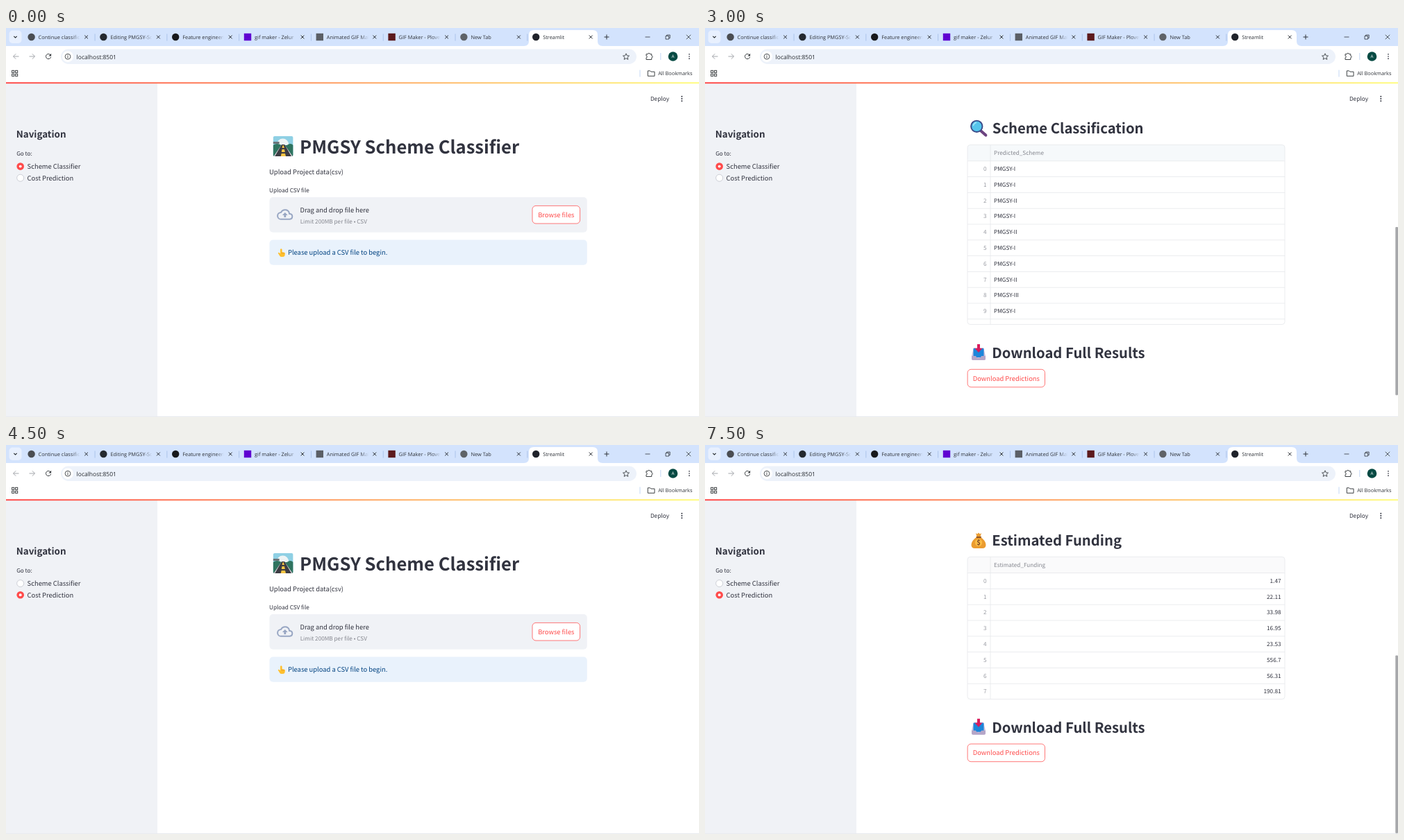
An HTML page for the animation above (9000 ms loop, 998 by 561 pixels).

```html
<!DOCTYPE html>
<html lang="en">
<head>
<meta charset="utf-8">
<title>Scheme Classifier</title>
<style>
  html, body { margin: 0; width: 100%; height: 100%; overflow: hidden; background: #fff; }
  #stage { display: block; width: 100vw; height: 100vh; }
  text { font-family: "Noto Sans CJK JP", "Noto Sans CJK SC", "Noto Sans CJK", sans-serif; white-space: pre; text-rendering: geometricPrecision; }
  .ui { font-family: "Open Sans", "Noto Sans", sans-serif; }
</style>
</head>
<body>
<svg id="stage" viewBox="0 0 998 561" xmlns="http://www.w3.org/2000/svg"></svg>
<script>
const INK = '#31333f', RED = '#ff4b4b', MUTED = '#85878f', PANEL = '#f0f2f6', STEEL = '#98a6c3', LINE = '#e6e8eb';
const BODY = 9.37, SMALL = 8.18, CELL = 8.2;

const text = (x, y, str, size = BODY, fill = INK, extra = '') =>
  `<text x="${x}" y="${y}" font-size="${size}" fill="${fill}" ${extra}>${str}</text>`;
const bold = (x, y, str, size) => text(x, y, str, size, INK, 'font-weight="700"');
const ui = (x, y, str, size = 7.4, fill = '#30343a', extra = '') => text(x, y, str, size, fill, `class="ui" ${extra}`);
const rect = (x, y, w, h, fill, r = 0, extra = '') =>
  `<rect x="${x}" y="${y}" width="${w}" height="${h}" rx="${r}" fill="${fill}" ${extra}/>`;
const circle = (x, y, r, fill, extra = '') => `<circle cx="${x}" cy="${y}" r="${r}" fill="${fill}" ${extra}/>`;
const shape = (d, fill) => `<path d="${d}" fill="${fill}"/>`;
const stroke = (d, color = '#3c4043', width = 1, extra = '') =>
  `<path d="${d}" fill="none" stroke="${color}" stroke-width="${width}" ${extra}/>`;
const cross = (x, y, r, color, width) =>
  stroke(`M${x - r} ${y - r}l${2 * r} ${2 * r}m0 ${-2 * r}l${-2 * r} ${2 * r}`, color, width);
const dots = (x, y, gap, r) => [-gap, 0, gap].map(d => circle(x, y + d, r, INK)).join('');
const move = (x, y, content, scale = 1) => `<g transform="translate(${x} ${y}) scale(${scale})">${content}</g>`;

// Browser window

const tabs = [
  ['Continue classification', 'circle', '#4a4d52'],
  ['Editing PMGSY-Scheme', 'circle', '#24292f'],
  ['Feature engineering', 'circle', '#17191c'],
  ['gif maker - Zelur', 'square', '#5f01d1'],
  ['Animated GIF Maker', 'square', '#5b5f66'],
  ['GIF Maker - Plovet', 'square', '#5c1a1d'],
  ['New Tab', 'circle', '#5f6368'],
  ['Streamlit', 'circle', '#20232b'],
];

function tab([title, kind, color], i) {
  const x = 36.6 + 103.8 * i, active = i === tabs.length - 1;
  const icon = kind === 'circle' ? circle(x, 13, 5.2, color) : rect(x - 5.2, 7.8, 10.4, 10.4, color);
  const back = active
    ? shape('M746 26q7 0 7-7V10q0-7 7-7h85q7 0 7 7v9q0 7 7 7z', '#fff')
    : rect(x + 91, 8.5, .9, 10, '#a8c0e8');
  return back + icon +
    `<svg x="${x + 9.6}" y="0" width="60" height="26">${ui(.4, 16, title)}</svg>` +
    (active ? '' : rect(x + 58, 6, 12, 14, 'url(#tabFade)')) +
    cross(x + 79, 13, 2.4, '#2b2f35', 1);
}

const toolbar = () => {
  const arrow = (x, dir) => stroke(`M${x - 4 * dir} 41h${8 * dir}m${-3.7 * dir}-3.7l${3.7 * dir} 3.7l${-3.7 * dir} 3.7`, '#a3a6ab', 1);
  return arrow(14.5, -1) + arrow(37.5, 1) +
    stroke('M64.2 39.2a3.6 3.6 0 1 0 .4 2.6') + shape('M65.1 36.8v3.6h-3.6z', '#3c4043') +
    rect(79, 30.5, 829, 21.5, '#edf2fa', 10.7) +
    circle(89, 41.2, 8, '#fff') + circle(89, 41.2, 3.9, 'none', 'stroke="#3c4043" stroke-width=".9"') +
    rect(88.5, 40.5, 1, 2.8, '#3c4043') + rect(88.5, 38.8, 1, 1, '#3c4043') +
    ui(101.6, 44.5, 'localhost:8501', 8.5, '#24282d') +
    stroke('M893 36.8l1.3 3 3.2.3-2.4 2.1.7 3.2-2.8-1.7-2.8 1.7.7-3.2-2.4-2.1 3.2-.3z', '#3c4043', .9) +
    stroke('M922 37.6h2.6a1.3 1.3 0 0 1 2.6 0h2.6v2.6a1.3 1.3 0 0 1 0 2.6v2.7H922v-2.7a1.3 1.3 0 0 0 0-2.6z') +
    rect(942.3, 36, 1, 10, '#c4d7f5') +
    circle(960.5, 41, 6.8, '#064a43') + ui(960.5, 43.3, 'A', 6.2, '#fff', 'text-anchor="middle"') +
    dots(984, 41, 3.2, .85);
};

const bookmarks = () =>
  [8.6, 13.6].map(x => [61.3, 66.3].map(y =>
    rect(x, y, 3.1, 3.1, 'none', 0, 'stroke="#3c4043" stroke-width="1"')).join('')).join('') +
  rect(912.5, 60.5, 1, 10, '#c4d7f5') +
  stroke('M924.3 61.8h3.3l1.2 1.3h5.2v6.2h-9.7z') +
  ui(939.2, 67.6, 'All Bookmarks');

const chrome = () =>
  rect(0, 0, 998, 26, '#d3e3fd') + rect(4.5, 3.5, 18, 18.5, '#e8f0fe', 5) +
  stroke('M11.3 11.8l2.2 2.2 2.2-2.2', '#24282d', 1.1) +
  tabs.map(tab).join('') +
  stroke('M861.5 13h7M865 9.5v7', '#30343a') +
  stroke('M920.5 13h7', '#30343a', .8) +
  stroke('M950 11.5h4.6v4.6H950zM951.6 11.3V10h4.6v4.6h-1.4', '#30343a', .8) +
  cross(983, 13, 3.2, '#30343a', .8) +
  toolbar() + bookmarks();

// Emoji, drawn around their top left corner

const road = `<g clip-path="url(#tile)">` +
  rect(0, 0, 29, 29, '#8fd0e4') + circle(14, 12, 8.5, '#eef4f5') +
  shape('M0 13q6-4 12 0h8q5-4 9 0v16H0z', '#2f7460') + rect(0, 8, 9, 3, '#6b7479') +
  shape('M12.5 12h4L28 29H1z', '#3d3c43') + shape('M14 13h1l1.3 4h-3.4zM12.8 19h3.6l.8 4h-5zM12 25h5.4l1 4h-7.2z', '#f6c443') +
  shape('M12.5 12L1 29h1.6zM16.5 12L28 29h-1.6z', '#e5e4e8') + '</g>';

const magnifier =
  stroke('M15.5 16.5l6.8 6', '#6c4380', 4.2, 'stroke-linecap="round"') +
  circle(9.3, 9.8, 8.2, '#55c5ec', 'stroke="#3a4a88" stroke-width="1.9"') +
  stroke('M4.5 8.5a5.4 5.4 0 0 1 4-4', '#a5e5fa', 1.4, 'stroke-linecap="round"');

const inbox =
  shape('M3 5h14l3 12v4q0 2-2 2H2q-2 0-2-2v-4z', '#cfc2df') + rect(2.5, 6, 15, 13, '#1d86da', 1) +
  shape('M0 17h6q1 3 4 3t4-3h6v4q0 2-2 2H2q-2 0-2-2z', '#b5a6c8') +
  shape('M8 0h4v6h3.5L10 12 4.5 6H8z', '#d91c5c');

const moneyBag =
  shape('M6 1l2 1.5 2-2 2 2L14 1l-1.5 5.5q8 5.5 8 11.5 0 5-5 5h-11q-5 0-5-5 0-6 8-11.5z', '#eb9c30') +
  shape('M6.5 6h7.5l-.5 2H7z', '#8f5426') + circle(10, 14.8, 5.2, '#fbbd45') +
  text(10, 18.2, '$', 9.5, '#774126', 'font-weight="700" text-anchor="middle"');

const hand =
  shape('M3.5 1q1.6-1.5 2.6.4V5.2l3.2.6q1.2.3 1.1 1.7L10 10.2q-.6 1.8-2.5 1.8H5Q3.5 12 2.6 10.5L.3 6.8q.6-1.5 2-.6l1.2 1z', '#ffc02f') +
  stroke('M6.2 5.4v2.4M8.2 5.8v2', '#d98c20', .6);

// Page parts

const radio = (y, on) => on
  ? circle(20.7, y, 5.3, RED) + circle(20.7, y, 1.95, '#fff')
  : circle(20.7, y, 5, '#fff', 'stroke="#b9bcc5" stroke-width=".7"');

const sidebar = choice =>
  rect(0, 80, 218, 480, PANEL) + bold(14.7, 158.2, 'Navigation', 13.4) + text(15.2, 183.6, 'Go to:', SMALL) +
  ['Scheme Classifier', 'Cost Prediction'].map((label, i) =>
    radio(199.6 + 16.6 * i, i === choice) + text(30.6, 203.1 + 16.6 * i, label)).join('');

const button = (x, y, w, label) =>
  rect(x, y, w, 25.6, '#fff', 5, `stroke="${RED}" stroke-width=".75"`) +
  text(x + w / 2, y + 16.2, label, BODY, RED, 'text-anchor="middle"');

const cloud = shape('M19.35 10.04A7.5 7.5 0 0 0 12 4C9.1 4 6.6 5.64 5.35 8.04A6 6 0 0 0 0 14a6 6 0 0 0 6 6h13a5 5 0 0 0 .35-9.96z' +
  'M19 18H6a4 4 0 0 1-.44-7.97l1.07-.11.5-.95A5.5 5.5 0 0 1 17.39 10.43l.3 1.5 1.53.11A3 3 0 0 1 19 18z' +
  'M8 13h2.55v3h2.9v-3H16l-4-4z', `${STEEL}" fill-rule="evenodd`);

const uploader = () =>
  move(384.6, 156, road) + bold(423.1, 181, 'PMGSY Scheme Classifier', 25.62) +
  text(379.1, 210.5, 'Upload Project data(csv)') + text(379.1, 236.5, 'Upload CSV file', SMALL) +
  rect(379.5, 244, 457.3, 50.8, PANEL, 5) + move(390.1, 257.3, cloud, .975) +
  text(423.5, 266.1, 'Drag and drop file here') +
  text(423.7, 281.6, 'Limit 200MB per file • CSV', SMALL, MUTED) +
  button(758, 256.4, 68.6, 'Browse files');

const emptyPage = () => uploader() +
  rect(379.5, 305.5, 457.3, 36.3, '#e9f2fc', 5) + move(391.5, 318, hand) +
  text(406, 327.4, 'Please upload a CSV file to begin.', BODY, '#004280');

// Columns are [left edge, title, right text edge or 0]; rows are numbered from 0.
function table(top, bottom, columns, rows, headFill = '#f6f9fb') {
  const head = top + 23.3, step = 22.8, height = bottom - top;
  const cell = (value, [left, , right], y) => right
    ? text(right, y, value, CELL, INK, 'text-anchor="end"')
    : text(left + 5, y, value, CELL);
  const body = rows.map((row, i) => {
    const y = head + step * i, base = y + 14.2;
    return text(405.5, base, i, CELL, '#999ba3', 'text-anchor="end"') +
      row.map((value, c) => cell(value, columns[c], base)).join('') +
      rect(378, y + step - .4, 457, .8, LINE);
  }).join('');
  return `<svg x="378" y="${top}" width="457" height="${height}" viewBox="378 ${top} 457 ${height}">` +
    rect(378, top, 457, 23.3, headFill, 4) + rect(378, head - .4, 457, .8, LINE) + body +
    columns.map(([x, title]) => rect(x - .4, top, .8, height, LINE) +
      text(x + 5, top + 14.9, title, SMALL, MUTED)).join('') + '</svg>' +
    rect(378, top, 457, height, 'none', 4, `stroke="${LINE}" stroke-width=".8"`);
}

const region = 'Dhumora And Hulegar';
const districts = ['Hulegar', ...Array(2).fill('North and Middle Dhumora'), ...Array(2).fill('South Dhumora')];
const sanctioned = [3, 32, 24, 32, 24];
const schemes = [1, 1, 2, 1, 2, 1, 1, 2, 3, 1].map(n => 'PMGSY-' + 'I'.repeat(n));
const funding = [1.47, 22.11, 33.98, 16.95, 23.53, 556.7, 56.31, 190.81];
const placeColumns = [[411, 'STATE_NAME', 0], [506.6, 'DISTRICT_NAME', 0]];
const workTitle = 'NO_OF_ROAD_WORK_SANCTIONED';

const scrollbar = (top, bottom) => rect(994.3, top, 3.7, bottom - top, '#a6a7aa', 1);

const filePage = (name, size, sizeX, columns, rows) =>
  move(-1.8, 0, uploader()) +
  stroke('M394.8 309.2h6.3l4.6 4.5v9.2h-10.9zM400.8 309.4v4.6h4.7', STEEL, 1.4) +
  text(422, 318.5, name) + text(sizeX, 318.4, size, SMALL, MUTED) +
  cross(818.3, 315.6, 3.4, INK, 1.2) + bold(376.9, 366.8, 'Uploaded data', 15.7) +
  table(382, 519.3, [...placeColumns, ...columns], rows);

const heading = (x, y, icon, iconX, iconY, label) => move(iconX, iconY, icon) + bold(x, y, label, 20.25);
const classification = dy => heading(413.8, 152.2 + dy, magnifier, 382, 132 + dy, 'Scheme Classification');
const estimate = dy => heading(413.2, 144.9 + dy, moneyBag, 384, 126 + dy, 'Estimated Funding');
const download = y => heading(413.2, y, inbox, 384, y - 20, 'Download Full Results') +
  button(378.1, y + 16.3, 111.4, 'Download Predictions');

const scenes = [
  [0, emptyPage()],
  [0, filePage('sample pmgsy ds.csv', '1.3KB', 518.7,
    [[621.6, workTitle, 763], [768.5, 'LENGTH_OF_ROAD_WORK_SANCTIONED', 0]],
    districts.map((d, i) => [region, d, sanctioned[i]])) + classification(414) + scrollbar(117.5, 321)],
  [0, classification(0) + table(168.5, 427.5, [[411, 'Predicted_Scheme', 0]], [...schemes, ''].map(s => [s])) +
    download(476) + scrollbar(287, 529.5)],
  [1, emptyPage()],
  [1, filePage('sample 2 pmgsy data.csv', '0.9KB', 535,
    [[621.6, 'PMGSY_SCHEME', 0], [695.6, workTitle, 837]],
    districts.map((d, i) => [region, d, schemes[i], sanctioned[i]])) + estimate(421) + scrollbar(117.5, 335)],
  [1, estimate(0) + table(161.3, 366.5, [[411, 'Estimated_Funding', 829.5]], funding.map(v => [v]), '#fafafb') +
    download(414.8) + scrollbar(303.5, 560)],
];

const stage = document.getElementById('stage');
stage.innerHTML = `<defs>
  <linearGradient id="tabFade"><stop stop-color="#d3e3fd" stop-opacity="0"/><stop offset="1" stop-color="#d3e3fd"/></linearGradient>
  <linearGradient id="ribbon"><stop stop-color="${RED}"/><stop offset="1" stop-color="#fffd80"/></linearGradient>
  <clipPath id="tile"><rect width="29" height="29" rx="2.5"/></clipPath>
</defs>` + rect(0, 0, 998, 561, '#fff') +
  scenes.map(([choice, content]) => `<g class="scene">${sidebar(choice)}${content}</g>`).join('') +
  chrome() + rect(0, 78.2, 998, 2, 'url(#ribbon)') +
  text(927.9, 105, 'Deploy', 8.3) + dots(973.3, 102, 3.3, 1) +
  rect(0, 559.8, 998, 1.2, '#e9ebef');

const layers = stage.querySelectorAll('.scene');
function draw() {
  const current = Math.floor(performance.now() % 9000 / 1500);
  layers.forEach((layer, i) => layer.setAttribute('display', i === current ? 'inline' : 'none'));
  requestAnimationFrame(draw);
}
draw();
</script>
</body>
</html>
```
